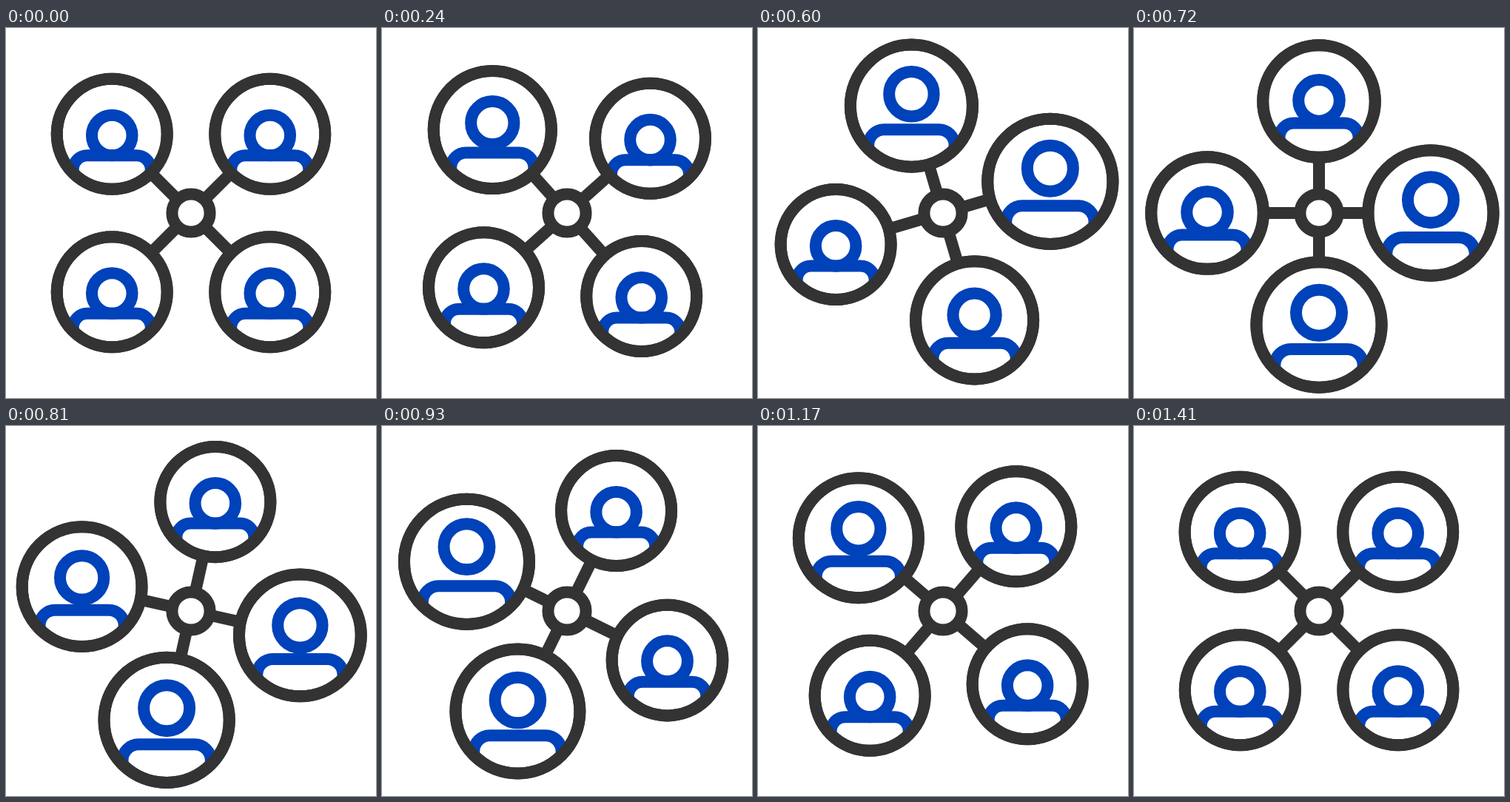
An HTML page with a canvas for the animation above (1440 ms loop, 500 by 500 pixels).

```html
<!DOCTYPE html>
<html lang="en">
<head>
<meta charset="utf-8">
<title>Team network</title>
<style>
  html, body { margin: 0; width: 100%; height: 100%; overflow: hidden; background: #fff; }
  canvas { display: block; width: 100vmin; height: 100vmin; }
</style>
</head>
<body>
<canvas id="stage" width="500" height="500"></canvas>
<script>
const ctx = document.getElementById('stage').getContext('2d');
const LOOP = 1440, STEP = 30;
const DARK = '#333333', BLUE = '#0042ba';
const ORBIT = 151, RING = 74.5, GROWTH = 0.136;

// pulse: start of growth, full size, start of shrinking, rest; lift: head rise at full size
const people = [
  { angle: -135, pulse: [0, 480, 480, 820], lift: 22.5 },
  { angle: -45, pulse: [240, 480, 720, 970], lift: 19.8 },
  { angle: 45, pulse: [480, 720, 860, 1180], lift: 18.2 },
  { angle: 135, pulse: [620, 960, 960, 1440], lift: 22.5 }
];

// Symmetric cubic Bezier (a, 0, 1 - a, 1)
function ease(x, a = 0.566) {
  if (x <= 0) return 0;
  if (x >= 1) return 1;
  let low = 0, high = 1, s = 0.5;
  for (let i = 0; i < 24; i++) {
    s = (low + high) / 2;
    const u = 1 - s;
    if (3 * a * s * u * u + 3 * (1 - a) * s * s * u + s * s * s < x) low = s;
    else high = s;
  }
  return s * s * (3 - 2 * s);
}

const between = (t, from, to) => ease((t - from) / (to - from));

function circle(x, y, r) {
  ctx.beginPath();
  ctx.arc(x, y, r, 0, Math.PI * 2);
}

function ring(x, y, r) {
  circle(x, y, r);
  ctx.fillStyle = '#fff';
  ctx.fill();
  ctx.strokeStyle = DARK;
  ctx.stroke();
}

function drawPerson(x, y, grow, lift) {
  const k = 1 + GROWTH * grow;
  const r = RING * k;
  ring(x, y, r);

  ctx.save();
  circle(x, y, r);
  ctx.clip();
  ctx.translate(x, y);
  ctx.strokeStyle = BLUE;
  circle(0, 1.8 * k - lift * grow, 27.3 * k);
  ctx.stroke();
  ctx.beginPath();
  ctx.moveTo(-52.5 * k, 62 * k);
  ctx.arcTo(-52.5 * k, 29 * k, 0, 29 * k, 19 * k);
  ctx.arcTo(52.5 * k, 29 * k, 52.5 * k, 62 * k, 19 * k);
  ctx.lineTo(52.5 * k, 62 * k);
  ctx.stroke();
  ctx.restore();

  circle(x, y, r);
  ctx.strokeStyle = DARK;
  ctx.stroke();
}

function draw(t) {
  ctx.fillStyle = '#fff';
  ctx.fillRect(0, 0, 500, 500);
  ctx.lineWidth = 16;
  const turn = 90 * ease(t / LOOP);

  const placed = people.map(({ angle, pulse, lift }) => {
    const a = (angle + turn) * Math.PI / 180;
    return {
      x: 250 + ORBIT * Math.cos(a),
      y: 250 + ORBIT * Math.sin(a),
      grow: between(t, pulse[0], pulse[1]) - between(t, pulse[2], pulse[3]),
      lift
    };
  });

  ctx.strokeStyle = DARK;
  for (const p of placed) {
    ctx.beginPath();
    ctx.moveTo(250, 250);
    ctx.lineTo(p.x, p.y);
    ctx.stroke();
  }
  for (const p of placed) drawPerson(p.x, p.y, p.grow, p.lift);
  ring(250, 250, 25.6);
}

const start = performance.now();

function tick() {
  const t = (performance.now() - start) % LOOP;
  draw(Math.floor(t / STEP) * STEP);
  requestAnimationFrame(tick);
}
tick();
</script>
</body>
</html>
```
